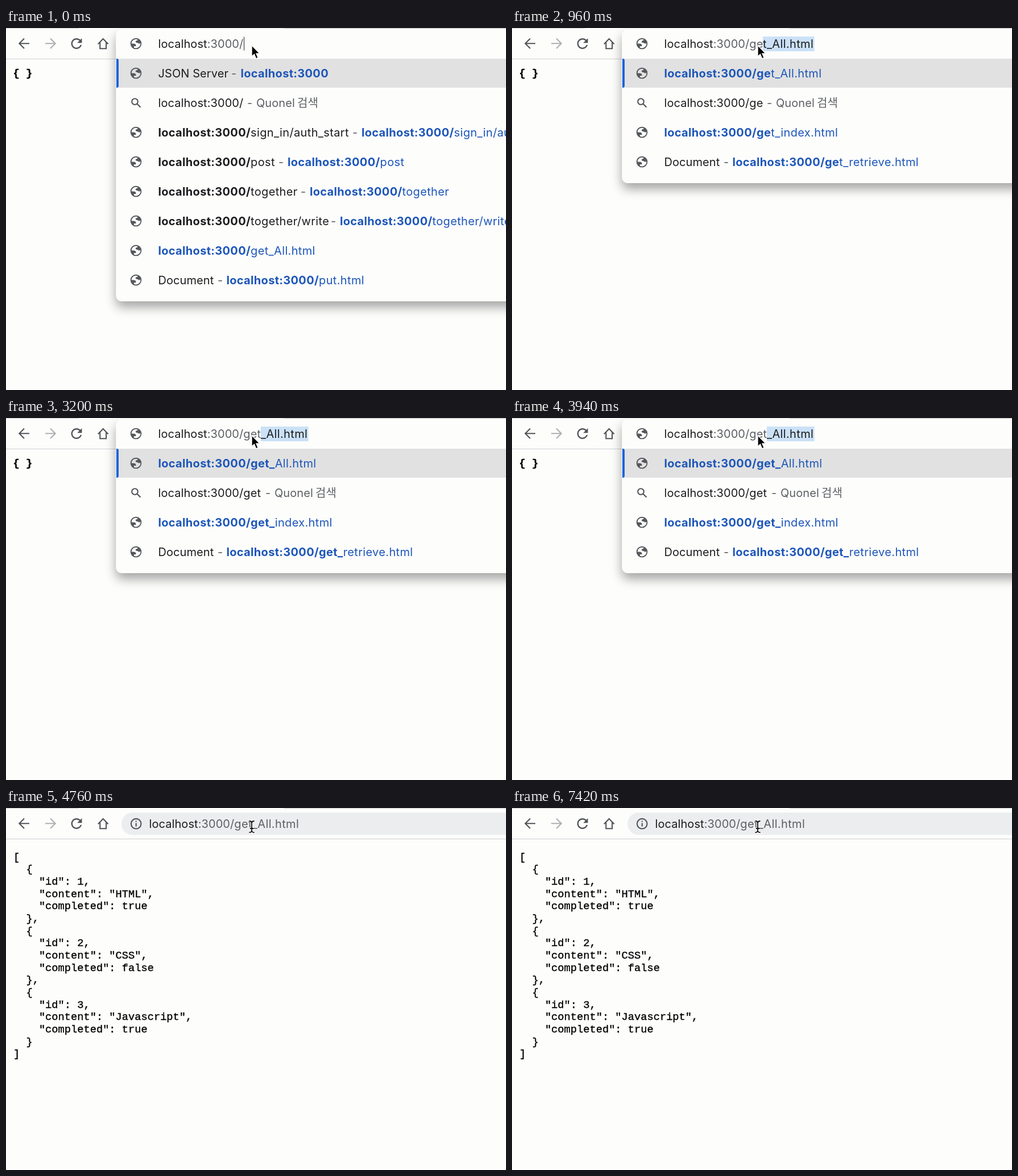
An HTML page that plays this animation: 879x637 px, repeating every 7440 ms.

```html
<!DOCTYPE html>
<html lang="ko">
<head>
<meta charset="utf-8">
<title>Address bar</title>
<style>
  html, body { margin: 0; width: 100%; height: 100%; overflow: hidden; background: #fdfdfc; }
  svg { display: block; }
  text { font: 20px Inter, "Noto Sans CJK KR", "Noto Sans CJK", sans-serif; letter-spacing: .08px; fill: #1d1d1f; white-space: pre; }
  .b { font-weight: 700; letter-spacing: .32px; }
  .path { letter-spacing: .35px; }
  .url { fill: #1d56b9; }
  .dim { fill: #5c5f63; }
  .mono { font: 18.72px "Liberation Mono", monospace; letter-spacing: 0; fill: #000; stroke: #000; stroke-width: .35; }
  .line { fill: none; stroke: #505357; stroke-width: 2.1; }
  .scene { display: none; }
</style>
</head>
<body>
<svg id="stage" width="879" height="637" viewBox="0 0 879 637">
  <defs>
    <filter id="shadow" x="-10%" y="-20%" width="120%" height="150%">
      <feDropShadow dx="0" dy="10" stdDeviation="9.5" flood-color="#000" flood-opacity=".36"/>
    </filter>
    <path id="globe" transform="scale(.98) translate(-10 -10)" fill="#54575b" fill-rule="evenodd" d="M10 0a10 10 0 0 0 0 20 10 10 0 0 0 0-20zM2 10h3.4c3.4 0 4.9 1.5 4.6 4.6H6.3v2.5A8 8 0 0 0 17.9 8.7C17.2 9.6 16.6 10 15.7 10c-1.4 0-1.4-1-3-1.3-2.2-.4-3.4-1-3.4-2.5 0-1.6 1.9-1.6 2.9-1.9.7-.3.7-1 .8-1.7A8 8 0 0 0 2 10z"/>
    <g id="lens" class="line"><circle cx="-2" cy="-2" r="5.3"/><path d="M2 2L8 8"/></g>
    <path id="back" d="M9 0H-8M0-8.7L-8.7 0 0 8.7"/>
    <path id="reload" fill="#505357" transform="translate(124 27.5) scale(1.18) translate(-12 -12)" d="M17.65 6.35C16.2 4.9 14.21 4 12 4c-4.42 0-7.99 3.58-7.99 8s3.57 8 7.99 8c3.73 0 6.84-2.55 7.73-6h-2.08c-.82 2.33-3.04 4-5.65 4-3.31 0-6-2.69-6-6s2.69-6 6-6c1.66 0 3.14.69 4.22 1.78L13 11h7V4l-2.35 2.35z"/>
    <path id="stop" class="line" d="M116 19.5l16 16m0-16l-16 16"/>
    <g id="pill">
      <rect x="203" y="8" width="720" height="39.5" rx="19.7" fill="#ecedef"/>
      <g class="line"><circle cx="228.7" cy="27.7" r="8.8"/><path d="M228.7 26.5v6M228.7 22.4v2.2"/></g>
      <text x="251.5" y="35">localhost<tspan class="dim">:3000/</tspan><tspan class="dim path">get_All.html</tspan></text>
    </g>
    <path id="arrow" d="M432 30.5v19.8l4.4-4.1 3.2 7.6 3.5-1.5-3.2-7.4h5.9z" fill="#000" stroke="#fff" stroke-width="1.3"/>
    <path id="beam" d="M427.5 23q4.5 0 4.5 3.5q0-3.5 4.5-3.5M432 26v14M427.5 43q4.5 0 4.5-3.5q0 3.5 4.5 3.5M429 36h6" fill="none"/>
  </defs>
  <rect width="879" height="637" fill="#fdfdfc"/>
  <path d="M0 .5H128M488 .5H879M0 54.5H879" stroke="#cfd0d1"/>
  <use href="#back" class="line" x="32" y="27.3"/>
  <use href="#back" class="line" style="stroke:#adafb1" transform="translate(78 27.3) scale(-1 1)"/>
  <path class="line" d="M161.8 28.2L170.7 19l8.9 9.2M165.3 25.5v10.7h10.8V25.5"/>
</svg>
<script>
const LOOP = 7440;
const HOST = "localhost:3000/";
const stage = document.getElementById("stage");

const span = (s, cls = "", x) => `<tspan class="${cls}"${x ? ` x="${x}"` : ""}>${s}</tspan>`;
const dash = x => span("-", "dim", x);
const use = (id, x = 0, y = 0) => `<use href="#${id}" x="${x}" y="${y}"/>`;

// Matched part in bold, remainder in regular weight
const link = (match, rest, cls, x) => span(HOST + match, "b " + cls, x) + span(rest, "path " + cls);

const site = (path, dashX) =>
  link("", path, "", 267.5) + dash(dashX) + link("", path, "url", dashX + 16);

const search = (typed, dashX) => ({
  icon: "lens",
  text: span(HOST + typed, "", 267.5) + dash(dashX) +
    span("Quonel", "dim", dashX + 16) + span("검색", "dim", dashX + 88)
});

const titled = (title, dashX, url) => span(title, "", 267.5) + dash(dashX) + url;

function panel(rows, bar) {
  const list = rows.map((row, i) => {
    const y = 79.5 + 52 * i;
    return use(row.icon || "globe", 228.5, y) + `<text y="${y + 7.3}">${row.text || row}</text>`;
  }).join("");
  return `<rect x="193.5" y="2" width="740" height="${63 + 52 * rows.length}" rx="10" fill="#fdfdfc" filter="url(#shadow)"/>
    <rect x="194" y="54" width="690" height="51" fill="#e1e1e1"/>
    <path d="M194 54h1q3 0 3 3v45q0 3-3 3h-1z" fill="#1b63dd"/>` + bar + list;
}

function field(typed, rest, x) {
  const mark = rest
    ? `<rect x="${x}" y="15" width="${531.5 - x}" height="26" fill="#cbe1f7"/>`
    : `<path d="M418.5 15.5v24" stroke="#222"/>`;
  return mark + use("globe", 228.5, 27.5) +
    `<text x="267.5" y="35">localhost${span(":3000/" + typed, "dim")}${rest ? span(rest, "path", x) : ""}</text>`;
}

const matches = (typed, dashX) => {
  const rest = "get_".slice(typed.length);
  // The underscore joins the match once the word is complete
  const bold = typed === "get" ? "get_" : typed;
  const tail = rest === "_" ? "" : rest;
  return [
    link(bold, tail + "All.html", "url", 267.5),
    search(typed, dashX),
    link(bold, tail + "index.html", "url", 267.5),
    titled("Document", 372, link(bold, tail + "retrieve.html", "url", 387.5))
  ];
};

const recent = [
  titled("JSON Server", 396, span("localhost:3000", "b url", 412.5)),
  search("", 424),
  site("sign_in/auth_start", 609),
  site("post", 479),
  site("together", 518),
  site("together/write", 571),
  link("", "get_All.html", "url", 267.5),
  titled("Document", 372, link("", "put.html", "url", 387.5))
];

const todos = [
  { id: 1, content: "HTML", completed: true },
  { id: 2, content: "CSS", completed: false },
  { id: 3, content: "Javascript", completed: true }
];
const json = JSON.stringify(todos, null, 2).split("\n")
  .map((s, i) => `<text class="mono" x="13" y="${91.6 + 21.68 * i}">${s}</text>`).join("");

const empty = `<text class="mono" x="12.5" y="84.5" font-weight="700" style="font-weight:700">{ }</text>`;
const typing = (rows, bar) => empty + use("reload") + panel(rows, bar) + use("arrow");

const beam = `<g stroke="#fff" stroke-width="3.4">${use("beam")}</g><g stroke="#111" stroke-width="1.8">${use("beam")}</g>`;

const steps = [
  [0, typing(recent, field(""))],
  [400, typing(matches("g", 437), field("g", "et_All.html", 429.5))],
  [860, typing(matches("ge", 448), field("ge", "t_All.html", 441))],
  [1700, typing(matches("get", 456), field("get", "_All.html", 448))],
  [4440, empty + use("stop") + panel(matches("get", 456), use("pill")) + use("arrow")],
  [4600, use("reload") + use("pill") + json + beam]
];

stage.insertAdjacentHTML("beforeend", steps.map(s => `<g class="scene">${s[1]}</g>`).join(""));
const scenes = [...stage.querySelectorAll(".scene")];

function draw() {
  const t = performance.now() % LOOP;
  const now = steps.filter(s => s[0] <= t).length - 1;
  scenes.forEach((g, i) => { g.style.display = i === now ? "inline" : "none"; });
  requestAnimationFrame(draw);
}
draw();
</script>
</body>
</html>
```
